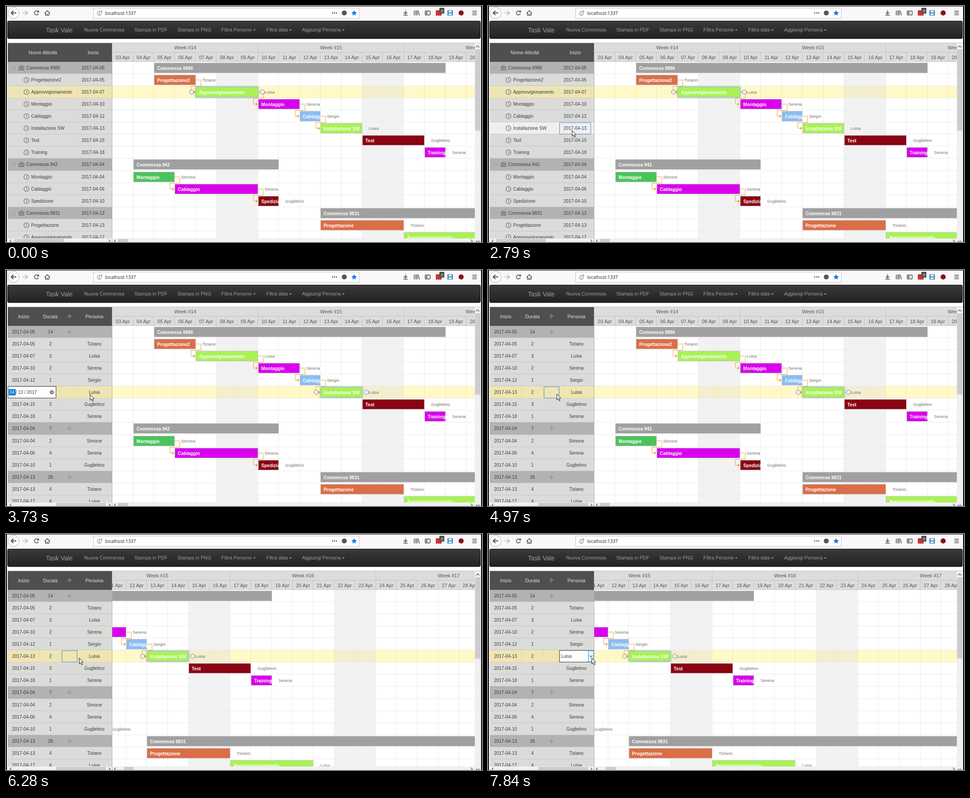
Write an HTML page that moves like this. It is 1061x528 px and loops after 8000 ms.

```html
<!DOCTYPE html>
<html lang="it">
<head>
<meta charset="utf-8">
<title>Gantt</title>
<style>
html, body { margin: 0; width: 100%; height: 100%; overflow: hidden; background: #fff; }
svg { display: block; }
#stage { position: absolute; left: 0; top: 0; }
text { font-family: "Liberation Sans", Arial, sans-serif; font-size: 10px; fill: #3c3c3c; white-space: pre; }
.mid { text-anchor: middle; }
.nav { font-size: 10.9px; fill: #9d9d9d; }
.head { font-size: 10.8px; fill: #e2e2e2; }
.scale { font-size: 10.9px; fill: #555; }
.bar { font-size: 10.2px; font-weight: bold; fill: #fff; }
.side { font-size: 9.4px; fill: #6e6e6e; }
.url { font-family: "Open Sans", sans-serif; font-size: 10.2px; fill: #222; }
.line { fill: none; stroke: #444; stroke-width: 1.5; }
.link { fill: none; stroke: #f0a030; stroke-width: 1; }
.knob { fill: #f2f2f2; stroke: #777; stroke-width: 1; }
.focus { fill: none; stroke: #4a86e0; stroke-width: 1; }
.glow { filter: drop-shadow(0 0 2px #3f9fd0); }
</style>
</head>
<body>
<svg id="stage" width="1061" height="528" viewBox="0 0 1061 528"></svg>
<script>
const LOOP = 8000, TOP = 124.6, ROW = 27.1, COL = 46.4, LEFT = 237.2;
const colors = { Tiziano: '#db6e48', Luisa: '#a9f255', Serena: '#d800ee', Sergio: '#8bbdf3', Guglielmo: '#8a0413', Simone: '#4ac45b' };

// name, start day (from 3 April), length, person; no person means a project
const tasks = [
  ['Commessa 9986', 2, 14],
  ['Progettazione2', 2, 2, 'Tiziano'],
  ['Approvvigionamento', 4, 3, 'Luisa'],
  ['Montaggio', 7, 2, 'Serena'],
  ['Cablaggio', 9, 1, 'Sergio'],
  ['Installazione SW', 10, 2, 'Luisa'],
  ['Test', 12, 3, 'Guglielmo'],
  ['Training', 15, 1, 'Serena'],
  ['Commessa 942', 1, 7],
  ['Montaggio', 1, 2, 'Simone'],
  ['Cablaggio', 3, 4, 'Serena'],
  ['Spedizione', 7, 1, 'Guglielmo'],
  ['Commessa 9831', 10, 26],
  ['Progettazione', 10, 4, 'Tiziano'],
  ['Approvvigionamento', 14, 4, 'Luisa']
];
const linked = [1, 2, 3, 4, 9, 10];

const css = [];
// Builds a stepped animation for one class from [time, declaration] pairs.
function steps(name, list) {
  const keys = list.map(([t, rule]) => `${t / LOOP * 100}%{${rule}}`).join('');
  css.push(`@keyframes ${name}{${keys}}.${name}{animation:${name} ${LOOP}ms step-end infinite}`);
}
// Visible only inside the given [from, to] spans.
function shown(name, ...spans) {
  const list = spans[0][0] ? [[0, 'visibility:hidden']] : [];
  for (const [from, to] of spans) {
    list.push([from, 'visibility:visible']);
    if (to < LOOP) list.push([to, 'visibility:hidden']);
  }
  steps(name, list);
}

const rect = (x, y, w, h, fill, more = '') => `<rect x="${x}" y="${y}" width="${w}" height="${h}" fill="${fill}" ${more}/>`;
const text = (x, y, s, cls = '') => `<text x="${x}" y="${y}" class="${cls}">${s}</text>`;
const path = (d, cls = 'line', more = '') => `<path d="${d}" class="${cls}" ${more}/>`;
const shape = (d, fill) => `<path d="${d}" fill="${fill}"/>`;
const group = (cls, s) => `<g class="${cls}">${s}</g>`;
const pane = (x, y, w, h, s) => `<svg x="${x}" y="${y}" width="${w}" height="${h}" viewBox="${x} ${y} ${w} ${h}">${s}</svg>`;
const rowY = i => Math.round(TOP + ROW * i);
const midY = i => rowY(i) + 13.5;
const dayX = k => Math.round(LEFT + COL * k);
const two = n => String(n).padStart(2, '0');

function browser() {
  let s = rect(0, 0, 1061, 32, '#f9f9fa');
  s += '<circle cx="17" cy="15.5" r="12.5" fill="#fff" stroke="#a5a5a5"/>';
  s += path('M23 15.5H12M16.5 10.5L11.5 15.5L16.5 20.5', 'line', 'style="stroke-width:1.8"');
  s += path('M37 15.5H47.5M43 10.5L48 15.5L43 20.5', 'line', 'style="stroke:#b0b0b0"');
  s += path('M71.5 12.5A4.6 4.6 0 1 0 72.3 17') + shape('M73.5 9.5V14.5H68.5Z', '#444');
  s += path('M86 16L92 10.5L98 16M88 15V20.5H96V15M92 20V17');
  s += rect(195.5, 4.5, 592, 23, '#fff', 'stroke="#c2c2c2"');
  s += '<circle cx="208" cy="16.5" r="4.5" fill="none" stroke="#555"/>' + rect(207.5, 16, 1, 3, '#555') + rect(207.5, 14, 1, 1, '#555');
  s += '<circle cx="213" cy="11.5" r="1.3" fill="#555"/>';
  s += text(221, 19.7, 'localhost:1337', 'url');
  for (const x of [728, 732.5, 737]) s += `<circle cx="${x}" cy="15.5" r="1.4" fill="#555"/>`;
  s += '<circle cx="754" cy="15.5" r="5.5" fill="#555"/>';
  let star = '';
  for (let i = 0; i < 10; i++) {
    const a = i * Math.PI / 5, r = i % 2 ? 3 : 6.7;
    star += `${776 + r * Math.sin(a)},${16 - r * Math.cos(a)} `;
  }
  s += `<polygon points="${star}" fill="#1b7ae0"/>`;
  s += path('M890.5 9.5V17M886.5 14L890.5 18L894.5 14M885.5 20.5H895.5');
  s += path('M910 10V21M913.5 10V21M916.5 10V21M918.5 10.5L921.5 21');
  s += '<rect x="934.5" y="11" width="11" height="9" rx="1" class="line"/>' + rect(936, 12.5, 3.5, 6, '#777');
  s += rect(958, 9.5, 13, 12, '#d0352b', 'rx="1"') + rect(966, 4, 11, 13, '#4d4d4d', 'rx="1"') + text(971.5, 13.6, '3', 'mid" style="fill:#fff;font-size:9px');
  s += rect(984, 9.5, 12, 12, '#2f7fb5', 'rx="1"') + rect(986.5, 10.5, 7, 4, '#fff') + rect(986, 16.5, 8, 4, '#d5e8f4');
  s += '<circle cx="1014.5" cy="15.5" r="5.7" fill="#8a0f1c"/>';
  s += path('M1039.5 11.5H1049.5M1039.5 15.5H1049.5M1039.5 19.5H1049.5');
  return s;
}

function navbar() {
  let s = '<defs><linearGradient id="dark" x2="0" y2="1"><stop stop-color="#3b3b3b"/><stop offset="1" stop-color="#212121"/></linearGradient></defs>';
  s += rect(3.5, 33.5, 1054, 39.5, 'url(#dark)', 'rx="3" stroke="#101010"');
  s += text(89, 59, 'Task Vale', 'nav" style="font-size:14px');
  // label, left edge, caret position
  const items = [['Nuova Commessa', 174], ['Stampa in PDF', 286], ['Stampa in PNG', 382], ['Filtra Persone', 480, 550.5], ['Filtra data', 580, 631], ['Aggiungi Persona', 660, 749]];
  for (const [name, x, caret] of items) {
    s += text(x, 57.3, name, 'nav');
    if (caret) s += shape(`M${caret} 52.5h6l-3 3z`, '#9d9d9d');
  }
  return s;
}

function plus(x, y, fill) {
  return rect(x - 5, y - 1.3, 10, 2.6, fill) + rect(x - 1.3, y - 5, 2.6, 10, fill);
}

function dateEditor() {
  const y = 260.5;
  return rect(159.5, y, 107, 26, '#fff', 'stroke="#333"') + rect(161, y + 6, 15.5, 14, '#0078d7') +
    text(163, 277, '04', '" style="fill:#fff') + text(176.5, 277, '/ 13 / 2017') +
    '<circle cx="257" cy="273.5" r="4.5" fill="#777"/>' + path('M255.3 271.8l3.4 3.4m0 -3.4l-3.4 3.4', '', 'stroke="#fff"');
}

function personEditor() {
  return rect(314.5, 260.5, 76, 26, '#fff', 'stroke="#333"') + text(317.5, 277, 'Luisa') +
    rect(378.5, 261, 12, 25, '#e5f1fb', 'stroke="#2a84d4"') + path('M381.5 272L384.5 275L387.5 272', 'line', 'style="stroke-width:1.2"');
}

function grid() {
  let back = '', s = '';
  const selections = { 2: 'selA', 5: 'selB' }, hovers = { 4: 'hover4', 5: 'hover5' };
  tasks.forEach((t, i) => {
    const y = rowY(i), h = rowY(i + 1) - y;
    const row = (fill, edge) => rect(4, y, 233, h, fill) + rect(4, y + h - 1, 233, 1, edge);
    back += row(t[3] ? '#dbdbda' : '#b2b2b2', '#c6c6c5');
    if (hovers[i]) back += group(hovers[i], row('#efefef', '#c6c6c5'));
    if (selections[i]) {
      back += group(selections[i], row('#eee5b3', '#e2d596'));
      s += group(selections[i], [158, 228, 278, 313].map(x => rect(x, y, 1, h, '#ead98c')).join(''));
    }
  });
  tasks.forEach(([name, start, days, person], i) => {
    const m = midY(i), b = m + 3.5;
    if (person) {
      s += `<circle cx="45.5" cy="${m}" r="5.5" fill="none" stroke="#7d7d7d" stroke-width="1.4"/>`;
      s += path(`M45.5 ${m - 3.5}V${m + .5}L48 ${m + 1.8}`, 'line', 'style="stroke:#7d7d7d;stroke-width:1.2"');
    } else {
      s += rect(13, m - 3.5, 7, 7, '#c9c9c9', 'stroke="#949494"') + rect(14.5, m - .5, 4, 1, '#444');
      s += rect(28, m - 3.5, 13, 9, '#858585', 'rx="1"') + path(`M32.5 ${m - 3.5}v-2h4v2`, '', 'fill="none" stroke="#858585" stroke-width="1.3"');
      s += rect(28, m + .8, 13, 1, '#b2b2b2') + plus(296.5, m, '#9d9d9d');
    }
    s += text(person ? 56 : 45, b, name);
    s += text(194, b, `2017-04-${two(start + 3)}`, 'mid') + text(254, b, days, 'mid') + text(352, b, person || '', 'mid');
  });
  s += group('dateFocus', '<rect x="159.5" y="261" width="69.5" height="25.5" class="focus"/>');
  s += group('plusFocus', '<rect x="280" y="261" width="33.5" height="25.5" class="focus"/>');
  s += group('dateEdit', dateEditor()) + group('personEdit', personEditor());
  const names = [['Nome Attività', 82], ['Inizio', 194.5], ['Durata', 254], ['Persona', 352]];
  const heads = names.map(([n, x]) => text(x, 107.6, n, 'head mid')).join('') + plus(296.5, 103.5, '#7f787b');
  return pane(4, 83, 232, 437, back + rect(4, 83, 233, 42, '#4f4f4f') + group('gridMove', s + heads));
}

function link(i) {
  const [, start, days] = tasks[i];
  const x1 = dayX(start + days), x2 = dayX(tasks[i + 1][1]);
  const y1 = midY(i), y2 = midY(i + 1), ym = rowY(i + 1) + .5;
  return path(`M${x1} ${y1}H${x1 + 11.5}V${ym}H${x2 - 10.5}V${y2}H${x2 - 4}`, 'link') + shape(`M${x2 - 5} ${y2 - 3.5}v7l4 -3.5z`, '#f09a18');
}

function bar(i) {
  const [name, start, days, person] = tasks[i];
  const x = dayX(start), w = dayX(start + days) - x, y = rowY(i) + 2;
  const box = rect(x + .5, y + .5, w - 1, 22, person ? colors[person] : '#a0a0a0', 'stroke="#bcbcbc"');
  return box + pane(x, y, w, 23, text(x + 7, y + 15.5, name, 'bar'));
}

function selected(i, cls) {
  const [, start, days] = tasks[i], y = midY(i), x = dayX(start), e = dayX(start + days);
  const glow = `<g class="glow">${rect(x, rowY(i) + 2, e - x, 23, colors.Luisa)}</g>` + bar(i);
  return group(cls, `<circle cx="${x - 9.5}" cy="${y}" r="4.7" class="knob"/><circle cx="${e + 9.5}" cy="${y}" r="4.7" class="knob"/>` + glow);
}

function timeline() {
  const days = 28, w = dayX(days) - 237;
  let s = rect(237, 125, w, 400, '#fff');
  const weekends = (y, h, fill) => [5, 12, 19, 26].map(k => rect(dayX(k), y, dayX(k + 2) - dayX(k), h, fill)).join('');
  const columns = (y, h, fill) => Array.from({ length: days }, (_, k) => rect(dayX(k + 1) - 1, y, 1, h, fill)).join('');
  s += weekends(125, 400, '#f2f2f2') + columns(125, 400, '#ebebeb');
  tasks.forEach((t, i) => s += rect(237, rowY(i + 1) - 1, w, 1, '#ebebeb'));
  for (const [i, cls] of [[2, 'selA'], [5, 'selB']]) {
    const y = rowY(i), h = rowY(i + 1) - y;
    s += group(cls, rect(237, y, w, h, '#fff8c8') + weekends(y, h, '#f3eed0') + columns(y, h, '#ffea86') + rect(237, y + h - 1, w, 1, '#f3ebc0'));
  }
  s += linked.map(link).join('');
  tasks.forEach((t, i) => s += bar(i));
  s += selected(2, 'selA') + selected(5, 'selB');
  tasks.forEach(([, start, n, person], i) => {
    if (person) s += text(dayX(start + n) + 14.5, midY(i) + 3.2, person, 'side');
  });
  s += rect(237, 83, w, 42, '#dcdcdb') + rect(237, 103, w, 1, '#c4c4c4') + rect(237, 124, w, 1, '#c4c4c4') + columns(104, 21, '#c4c4c4');
  for (let k = 0; k < days; k++) s += text(LEFT + COL * (k + .5), 118.6, `${two(k + 3)} Apr`, 'scale mid');
  for (let k = 0; k < 4; k++) s += rect(dayX(k * 7 + 7) - 1, 83, 1, 21, '#c4c4c4') + text(LEFT + COL * (k * 7 + 3.5), 97, `Week #${14 + k}`, 'scale mid');
  return pane(237, 83, 808, 437, group('timeMove', s));
}

function scrollbars() {
  const arrow = d => path(d, 'line', 'style="stroke:#555;stroke-width:1.3"');
  let s = rect(4, 520, 1054, 8, '#f0f0f0') + rect(1045, 83, 13, 437, '#f0f0f0');
  s += rect(1045.5, 97, 12, 182, '#cdcdcd') + arrow('M1048 92.5L1051.5 89L1055 92.5') + arrow('M1048 525L1051.5 528.5L1055 525');
  s += group('gridThumb', rect(18, 521, 111, 7, '#cdcdcd')) + group('timeThumb', rect(249.5, 521, 22, 7, '#cdcdcd'));
  s += arrow('M12 523L9 526L12 529') + arrow('M229 523L232 526L229 529');
  s += arrow('M244.5 523L241.5 526L244.5 529') + arrow('M1036.5 523L1039.5 526L1036.5 529');
  return s + rect(236, 83, 1, 445, '#b0b0b0') + rect(4, 82, 1054, 1, '#c6c6c6');
}

const cursor = group('cursor', '<path d="M.5 .5V13.5L3.5 10.7L5.7 15.8L7.8 14.9L5.6 9.9H9.3Z" fill="#fff" stroke="#111"/>');
const frame = rect(0, 0, 2, 528, '#000') + rect(1059, 0, 2, 528, '#000') + rect(0, 0, 1061, 1, '#000');

shown('selA', [0, 3020]);
shown('selB', [3020, LOOP]);
shown('hover4', [990, 1070]);
shown('hover5', [1070, 3020]);
shown('dateFocus', [2480, 3020], [3880, 4880]);
shown('dateEdit', [3020, 3880]);
shown('plusFocus', [4880, 6750]);
shown('personEdit', [6750, LOOP]);
const shift = (t, x) => [[0, 'transform:translate(0,0)'], [t, `transform:translate(${x}px,0)`]];
steps('gridMove', shift(3730, -155));
steps('gridThumb', shift(3730, 94));
steps('timeMove', shift(5120, -387));
steps('timeThumb', shift(5120, 13));

const stops = [
  [230, 879, 474], [320, 629, 345], [530, 330, 262], [610, 47, 189], [690, 260, 212], [760, 452, 236],
  [990, 225, 243], [1070, 197, 268], [1150, 187, 278]
];
// Adds level moves along the edited row, one stop per time.
const glide = (times, xs) => times.forEach((t, i) => stops.push([t, xs[i], 277]));
glide([4340, 4420, 4500, 4570, 4650, 4730], [183, 176, 169, 162, 156, 153]);
glide([6280, 6360, 6440, 6520, 6600, 6670], [163, 168, 175, 182, 187, 189]);
glide([7290, 7360, 7590, 7670, 7750, 7840], [204, 214, 219, 224, 228, 231]);
steps('cursor', [[0, 'transform:translate(-40px,0)'], ...stops.map(([t, x, y]) => [t, `transform:translate(${x}px,${y}px)`])]);

const style = document.createElement('style');
style.textContent = css.join('\n');
document.head.append(style);
document.getElementById('stage').innerHTML = browser() + navbar() + timeline() + grid() + scrollbars() + frame + cursor;
</script>
</body>
</html>
```
